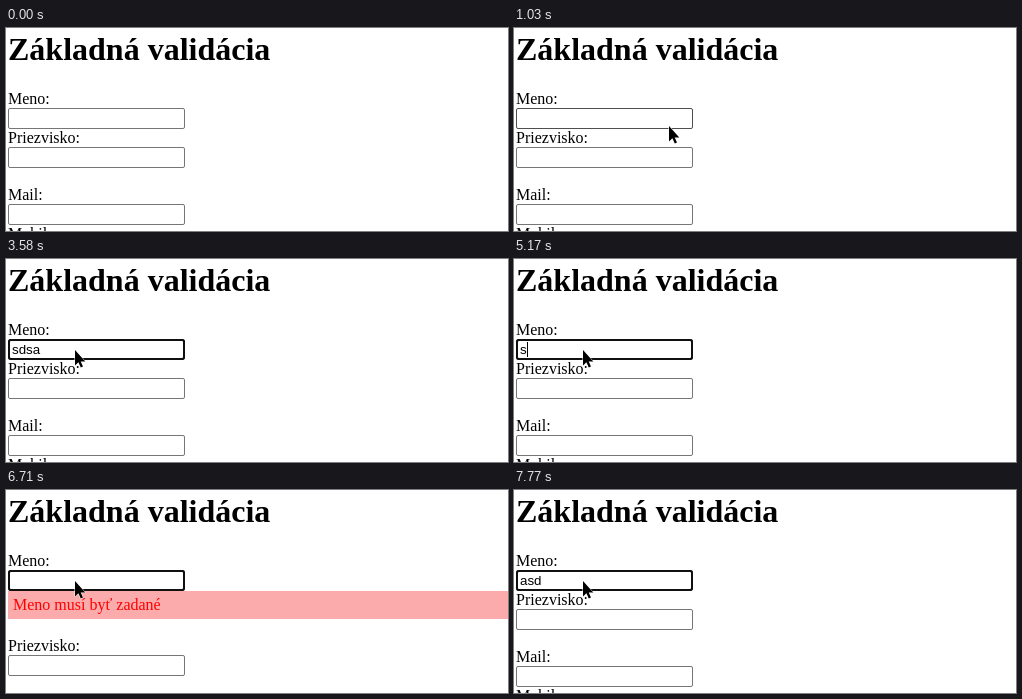
Animation, 502 px wide and 203 px high, one loop 8000 ms. Source, as an HTML page:

```html
<!DOCTYPE html>
<html lang="sk">
<head>
<meta charset="utf-8">
<style>
  html, body { margin: 0; width: 502px; height: 203px; overflow: hidden; background: #fff; }
  svg { display: block; }
  text { font: 16px "Liberation Serif", "Times New Roman", serif; white-space: pre; }
  .title { font-size: 32px; font-weight: bold; }
  .value { font: 13.333px "Liberation Sans", Arial, sans-serif; }
  .field { fill: #fff; stroke: #767676; }
</style>
</head>
<body>
<svg width="502" height="203" viewBox="0 0 502 203">
  <text class="title" x="2" y="32">Základná validácia</text>
  <text x="2" y="76">Meno:</text>
  <rect id="name" class="field" x="2.5" y="80.5" width="176" height="20" rx="1.5"/>
  <rect id="ring" x="3" y="81" width="175" height="19" rx="2" fill="none" stroke="#101010" stroke-width="2"/>
  <text id="value" class="value" x="6" y="95"></text>
  <rect id="caret" y="83" width="1" height="15"/>
  <g id="error">
    <rect x="2" y="101" width="500" height="28" fill="#fbabab"/>
    <text x="7" y="120" fill="#f00">Meno musí byť zadané</text>
  </g>
  <g id="rest">
    <text x="2" y="115">Priezvisko:</text>
    <rect class="field" x="2.5" y="119.5" width="176" height="20" rx="1.5"/>
    <text x="2" y="172">Mail:</text>
    <rect class="field" x="2.5" y="176.5" width="176" height="20" rx="1.5"/>
    <text x="2" y="211">Mobil:</text>
  </g>
  <path id="cursor" d="M0 0V15.5L3.4 12.3L5.8 17.6L8 16.6L5.7 11.4H10.3Z"
        stroke="#fff" stroke-width="1" paint-order="stroke"/>
</svg>
<script>
const LOOP = 8000, STEP = 70, FOCUS = 1400;
const CURSOR_IN = 260, CURSOR_REST = 1580;
const ERROR_ON = 5240, ERROR_OFF = 6780;

// [time, x, y]
const path = [
  [260, 441, 187], [400, 376, 164], [540, 327, 132], [750, 231, 113],
  [820, 206, 110], [1030, 154.5, 98], [1240, 102, 79], [1400, 72, 89], [1580, 69, 91]
];

// [time, text]
const edits = [
  [0, ""], [2310, "s"], [2570, "sd"], [2770, "sds"], [3050, "sdsa"],
  [4180, "sds"], [4510, "sd"], [4710, "s"], [5240, ""],
  [6780, "a"], [6980, "as"], [7240, "asd"]
];

// Times at which the caret turns on or off
const blinks = [FOCUS, 1910, 2310, 3580, 4110, 5650, 6180, 6710, 6780, 7770];

const el = id => document.getElementById(id);
const [nameBox, ring, value, caret, error, rest, cursor] =
  ["name", "ring", "value", "caret", "error", "rest", "cursor"].map(el);
const show = (node, on) => node.setAttribute("visibility", on ? "visible" : "hidden");

function cursorAt(t) {
  const time = t >= CURSOR_REST ? CURSOR_REST
    : CURSOR_IN + Math.floor((t - CURSOR_IN) / STEP) * STEP;
  const i = Math.max(1, path.findIndex(p => p[0] >= time));
  const [a, b] = [path[i - 1], path[i]];
  const k = (time - a[0]) / (b[0] - a[0]);
  return [1, 2].map(n => Math.round(a[n] + (b[n] - a[n]) * k));
}

function draw(t) {
  const text = edits.filter(e => e[0] <= t).pop()[1];
  value.textContent = text;
  caret.setAttribute("x", 6 + 7 * text.length);
  show(caret, blinks.filter(b => b <= t).length % 2 === 1);
  show(ring, t >= FOCUS);

  const invalid = t >= ERROR_ON && t < ERROR_OFF;
  show(error, invalid);
  rest.setAttribute("transform", `translate(0 ${invalid ? 46 : 0})`);

  const visible = t >= CURSOR_IN;
  show(cursor, visible);
  let hover = false;
  if (visible) {
    const [x, y] = cursorAt(t);
    cursor.setAttribute("transform", `translate(${x} ${y})`);
    hover = x >= 2 && x < 179 && y >= 80 && y < 101;
  }
  nameBox.style.stroke = hover ? "#4f4f4f" : "#767676";
}

const start = performance.now();
function tick() {
  draw((performance.now() - start) % LOOP);
  requestAnimationFrame(tick);
}
tick();
</script>
</body>
</html>
```
